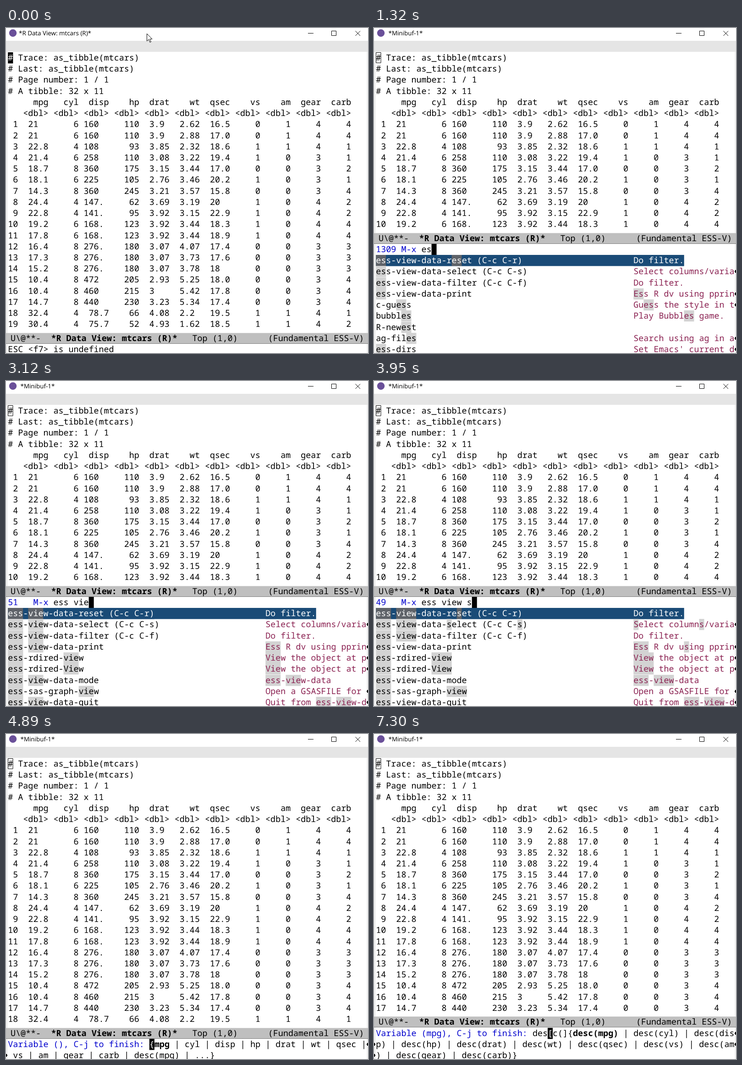
An HTML page that plays this animation: 790x709 px, repeating every 8000 ms.

```html
<!DOCTYPE html>
<html lang="en">
<head>
<meta charset="utf-8">
<title>Data view</title>
<style>
  html, body { margin: 0; width: 100%; height: 100%; overflow: hidden; background: #fff; }
  svg { display: block; width: 790px; height: 709px; }
  text { font: 18.37px "Noto Sans Mono", monospace; white-space: pre; text-rendering: geometricPrecision; fill: #000; }
  .title { font: 13.4px "Open Sans", sans-serif; }
  .bold { font-weight: 700; }
  .prompt { fill: #0000cd; }
  .doc, .docHit { fill: #8b2252; }
  .cursor, .pick, .pickHit { fill: #fff; }
</style>
</head>
<body>
<svg id="stage" viewBox="0 0 790 709" xmlns="http://www.w3.org/2000/svg"></svg>
<script>
const LOOP = 8000, PITCH = 24.22, CHAR = 11.02, LEFT = 4.3, COLS = 71, DOC_COL = 51;
const BACK = { cursor: '#000', hit: '#d3d3d3', docHit: '#d3d3d3', pick: '#1a4b77', pickHit: '#5f6369' };

const esc = s => s.replace(/&/g, '&amp;').replace(/</g, '&lt;');
const rect = (x, y, w, h, fill) => `<rect x="${x}" y="${y}" width="${w}" height="${h}" fill="${fill}"/>`;
const label = (x, y, s, cls = '') => `<text x="${x}" y="${y}" class="${cls}">${esc(s)}</text>`;
const stroke = (d, fill = 'none') => `<path d="${d}" fill="${fill}" stroke="#000"/>`;

// A run of characters on the grid, with its background
function run(col, base, s, cls = '') {
  if (!s) return '';
  const x = +(LEFT + col * CHAR).toFixed(2), y = Math.round(base);
  const back = BACK[cls] ? rect(x, y - 18, +(s.length * CHAR).toFixed(2), 24.3, BACK[cls]) : '';
  return back + label(x, y, s, cls);
}

// ---- table ----
const VARS = 'mpg cyl disp hp drat wt qsec vs am gear carb'.split(' ');

// A " stands for the value before it
const column = s => s.split(' ').reduce((a, v) => [...a, v === '"' ? a[a.length - 1] : v], []);
const cars = {
  mpg: column('21 " 22.8 21.4 18.7 18.1 14.3 24.4 22.8 19.2 17.8 16.4 17.3 15.2 10.4 " 14.7 32.4 30.4'),
  disp: column('160 " 108 258 360 225 360 147. 141. 168. " 276. " " 472 460 440 78.7 75.7'),
  hp: column('110 " 93 110 175 105 245 62 95 123 " 180 " " 205 215 230 66 52'),
  drat: column('3.9 " 3.85 3.08 3.15 2.76 3.21 3.69 3.92 " " 3.07 " " 2.93 3 3.23 4.08 4.93'),
  wt: column('2.62 2.88 2.32 3.22 3.44 3.46 3.57 3.19 3.15 3.44 " 4.07 3.73 3.78 5.25 5.42 5.34 2.2 1.62'),
  qsec: column('16.5 17.0 18.6 19.4 17.0 20.2 15.8 20 22.9 18.3 18.9 17.4 17.6 18 18.0 17.8 17.4 19.5 18.5'),
  carb: column('4 " 1 " 2 1 4 2 " 4 " 3 " " 4 " " 1 2')
};
cars.cyl = cars.disp.map(d => d > 270 ? 8 : d < 150 ? 4 : 6);
cars.vs = cars.cyl.map((c, i) => +(c < 8 && i > 1));
cars.am = cars.cyl.map((c, i) => +(i < 3 || i > 16));
cars.gear = cars.cyl.map((c, i) => (i > 2 && i < 7) || (i > 10 && i < 17) ? 3 : 4);

// Numbers line up on the end of their integer part
const END = { mpg: 6, cyl: 14, disp: 18, hp: 26, drat: 29, wt: 35, qsec: 42, vs: 50, am: 56, gear: 62, carb: 68 };
const carLine = i => VARS.reduce((s, v) => {
  const num = String(cars[v][i]);
  return s.padEnd(END[v] - num.split('.')[0].length) + num;
}, String(i + 1).padStart(2));

const BODY = [
  '# Trace: as_tibble(mtcars)',
  '# Last: as_tibble(mtcars)',
  '# Page number: 1 / 1',
  '# A tibble: 32 x 11',
  '  ' + VARS.map(v => v.padStart(6)).join(''),
  '  ' + VARS.map(() => ' <dbl>').join(''),
  ...cars.mpg.map((v, i) => carLine(i))
];

// ---- completion lists: "name|description", hits in braces ----
const mark = (rows, re) => rows.map(r => r.replace(re, '{$&}'));
const DATA = [
  'ess-view-data-reset (C-c C-r)|Do filter.',
  'ess-view-data-select (C-c C-s)|Select columns/varia+',
  'ess-view-data-filter (C-c C-f)|Do filter.',
  'ess-view-data-print|Ess R dv using pprin+'
];
const ES = [...DATA,
  'c-guess|Guess the style in t+', 'bubbles|Play Bubbles game.', 'R-newest|',
  'ag-files|Search using ag in a+', "ess-dirs|Set Emacs' current d+"];
const ESS = [...DATA,
  'c-guess|Guess the style in t+', "ess-dirs|Set Emacs' current d+",
  'ess-help|Display documentatio+', 'ess-mode|Major mode for editi+',
  'ess-quit|Issue an exiting com+'];
const VIEW = [
  '{ess}-{view}-data-re[s]et (C-c C-r)|Do filter.',
  '{ess}-{view}-data-[s]elect (C-c C-[s])|[S]elect column[s]/varia+',
  '{ess}-{view}-data-filter (C-c C-f)|Do filter.',
  '{ess}-view-data-print|{Ess} R dv u[s]ing pprin+',
  '{ess}-rdired-{view}|{View} the object at p+',
  '{ess}-rdired-{View}|{View} the object at p+',
  '{ess}-view-data-mode|{ess}-{view}-data',
  '{ess}-sas-graph-{view}|Open a GSASFILE for +',
  '{ess}-view-data-quit|Quit from {ess}-{view}-d+'];
const VIEW_S = VIEW.map(r => r.replace(/\[/g, '{').replace(/\]/g, '}'));
const VIEW_0 = VIEW.map(r => r.replace(/[[\]]/g, ''));
const VIEW_A = VIEW_0.map(r => r.replace('-data', '-d{a}ta'));
const PLAIN_VIEW = VIEW_0.map(r => r.replace(/[{}]/g, ''));
const SORT = 'ess-view-data-sort (C-c C-o)|Sort columns/variabl+';

// ---- minibuffer ----
const baseOf = (k, n) => 707 - PITCH * (n - 1 - k);
function fringe(x, base) {
  const y = Math.round(base) - 6;
  return rect(x, y - 1, 4, 2, '#000') + rect(x + 1, y - 3, 2, 6, '#000');
}

function marked(col, base, s, cls, hit) {
  return s.split(/[{}]/).map((part, i) => {
    const out = run(col, base, part, i % 2 ? hit : cls);
    col += part.length;
    return out;
  }).join('');
}

function ivy(count, input, rows, cursor = true) {
  const head = count.padEnd(5) + 'M-x ', n = 10;
  let out = run(0, baseOf(0, n), head, 'prompt') + run(9, baseOf(0, n), input);
  if (cursor) out += run(9 + input.length, baseOf(0, n), ' ', 'cursor');
  rows.forEach((row, i) => {
    const base = baseOf(i + 1, n), cut = row.endsWith('+');
    const [name, doc] = row.replace(/\+$/, '').split('|');
    if (i === 0) {
      const width = DOC_COL + doc.replace(/[{}]/g, '').length;
      out += run(0, base, ' '.repeat(width), 'pick');
      out += marked(0, base, name, 'pick', 'pickHit') + marked(DOC_COL, base, doc, 'pick', 'pickHit');
    } else {
      out += marked(0, base, name, '', 'hit') + marked(DOC_COL, base, doc, 'doc', 'docHit');
    }
    if (cut) out += fringe(787, base);
  });
  return { n, out };
}

function ido(chosen, typed, names, tail = '', hint = '') {
  const prompt = `Variable (${chosen}), C-j to finish: `;
  const s = prompt + typed + hint + '{' + names.join(' | ') + tail + '}';
  const cur = prompt.length + typed.length, first = s.indexOf('{') + 1;
  const n = Math.ceil(s.length / COLS);
  const style = i => i < prompt.length ? 'prompt' : i === cur ? 'cursor'
    : i >= first && i < first + names[0].length ? 'bold' : '';
  let out = '';
  for (let i = 0; i < s.length;) {
    const row = Math.floor(i / COLS), end = Math.min(s.length, (row + 1) * COLS);
    let j = i + 1;
    while (j < end && style(j) === style(i)) j++;
    out += run(i % COLS, baseOf(row, n), s.slice(i, j), style(i));
    i = j;
  }
  for (let k = 0; k < n - 1; k++) out += fringe(787, baseOf(k, n)) + fringe(-1, baseOf(k + 1, n));
  return { n, out };
}

// ---- window ----
function frame(at, { n, out }) {
  const idle = at === 0;
  const base = 707 - PITCH * n, top = Math.round(base - 18), y = Math.round(base);
  const count = Math.floor((base - 18 - 52.5) / PITCH);
  let s = rect(0, 0, 790, 709, '#fff') + rect(0, 28, 790, 24, '#e5e5e5')
    + rect(0, 52, 4, 657, '#f2f2f2') + rect(787, 52, 3, 657, '#f2f2f2')
    + '<circle cx="15" cy="11" r="8.2" fill="#6a5099"/>'
    + (idle ? label(28, 16, '*R Data View: mtcars (R)*', 'title') : label(31.5, 16, '*Minibuf-1*', 'title'))
    + stroke('M659 11.5h12M710.5 6.5h10v10h-10zM762.5 6.5l10.5 10.5M773 6.5l-10.5 10.5');
  BODY.slice(0, count).forEach((line, r) => { s += run(0, 71 + PITCH * r, line); });
  s += idle ? run(0, 71, '#', 'cursor') : stroke('M4.5 53.5h10.5v22.5h-10.5z');
  s += rect(0, top, 790, 24, '#bfbfbf') + rect(0, top, 790, 1, '#d8d8d8') + rect(0, top + 23, 790, 1, '#7f7f7f')
    + label(10, y, 'U\\@**-') + label(98.5, y, '*R Data View: mtcars (R)*', 'bold')
    + label(406.5, y, 'Top (1,0)') + label(572, y, '(Fundamental ESS-V)') + out;
  if (at < 1070) s += stroke('M307.5 12.5v16l3.8-3.5 2.7 6.2 2.5-1.1-2.7-6h5.2z', '#fff');
  return s;
}

const DESC = VARS.map(v => `desc(${v})`);
const MORE = ' | ...';
const D_NAMES = ['disp', 'drat', ...DESC.slice(0, 10)];

const VIEWS = [
  [0, { n: 1, out: run(0, 707, 'ESC <f7> is undefined') }],
  [840, ivy('9127', '', ES)],
  [1070, ivy('6082', 'e', mark(ES, /e/gi))],
  [1320, ivy('1309', 'es', mark(ES, /es/gi))],
  [1470, ivy('588', 'ess', mark(ESS, /ess/gi))],
  [1550, ivy('588', 'ess ', mark(ESS, /ess/gi))],
  [1780, ivy('588', 'ess ', mark(ESS, /ess/gi), false)],
  [2490, ivy('588', 'ess ', mark(ESS, /ess/gi))],
  [2710, ivy('163', 'ess v', mark(PLAIN_VIEW, /ess|v/gi))],
  [2950, ivy('74', 'ess vi', mark(PLAIN_VIEW, /ess|vi/gi))],
  [3120, ivy('51', 'ess vie', mark(PLAIN_VIEW, /ess|vie/gi))],
  [3170, ivy('49', 'ess view', VIEW_0)],
  [3340, ivy('49', 'ess view ', VIEW_0)],
  [3590, ivy('43', 'ess view a', VIEW_A)],
  [3900, ivy('49', 'ess view ', VIEW_0)],
  [3950, ivy('49', 'ess view s', VIEW_S)],
  [4110, ivy('2', 'ess view so', [...mark([SORT], /ess|view|so/gi), VIEW_0[7]])],
  [4280, ivy('1', 'ess view sor', mark([SORT], /ess|view|sor/gi))],
  [4510, ivy('1', 'ess view sort', mark([SORT], /ess|view|sort/gi))],
  [4890, ido('', '', [...VARS, DESC[0]], MORE)],
  [6370, ido('mpg', '', [...VARS.slice(1), DESC[0], DESC[1]], MORE)],
  [7000, ido('mpg', 'd', D_NAMES, MORE)],
  [7150, ido('mpg', 'de', DESC, '', '[sc(]')],
  [7300, ido('mpg', 'des', DESC, '', '[c(]')]
].map(([at, view]) => ({ at, svg: frame(at, view) }));

const stage = document.getElementById('stage');
const start = performance.now();
let shown = null;

function render(t) {
  const view = VIEWS.filter(v => v.at <= t).pop();
  if (view !== shown) stage.innerHTML = (shown = view).svg;
}

function tick() {
  render((performance.now() - start) % LOOP);
  requestAnimationFrame(tick);
}
tick();
</script>
</body>
</html>
```
